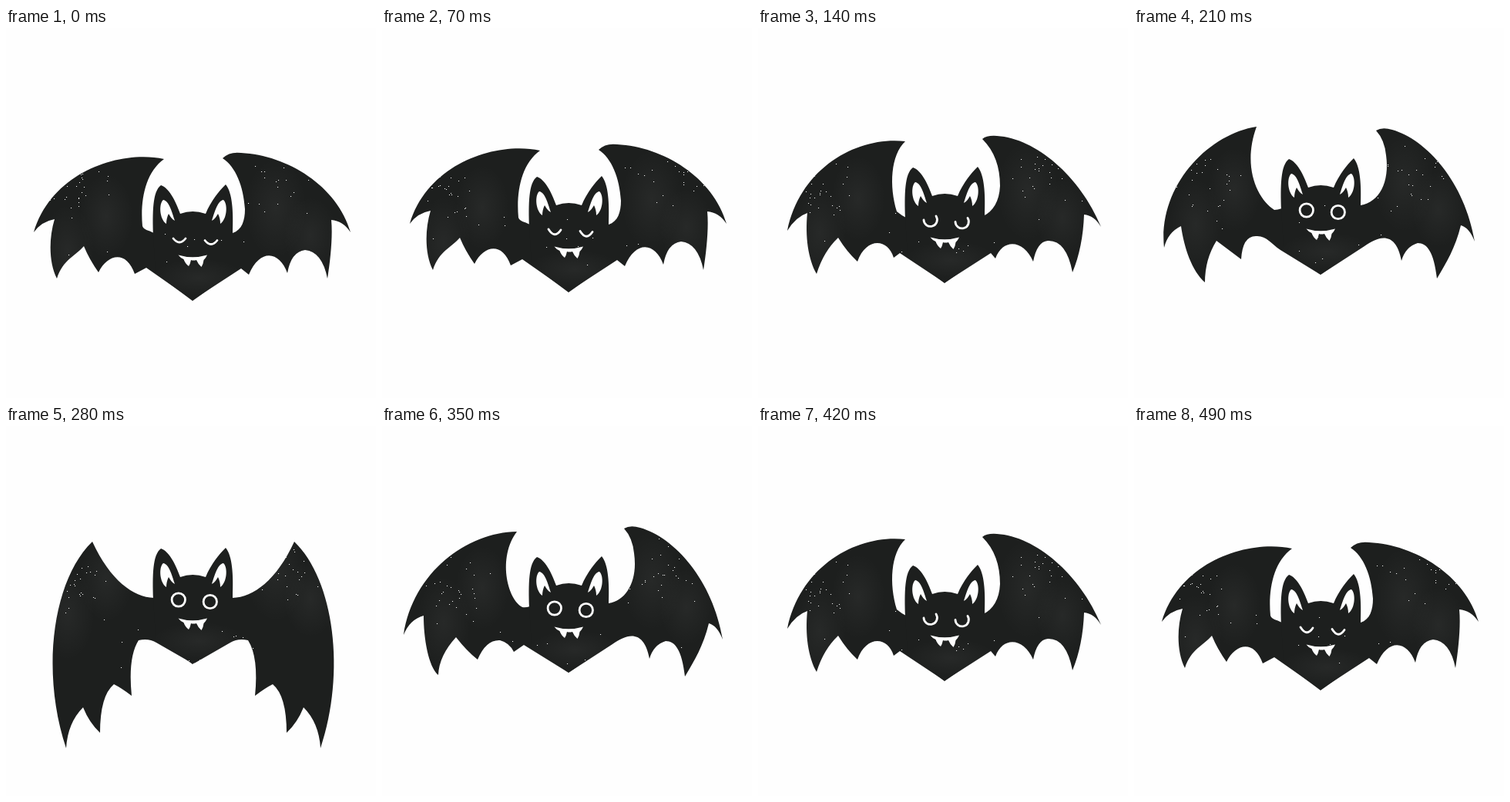
An HTML page for the animation above (560 ms loop, 480 by 480 pixels).

```html
<!DOCTYPE html>
<html lang="en">
<head>
<meta charset="utf-8">
<title>Flapping bat</title>
<style>
  html, body { margin: 0; width: 100%; height: 100%; overflow: hidden; background: #fefefe; }
  svg { display: block; width: 100%; height: 100%; }
  .ink { fill: #1d1f1e; }
  .white { fill: #fefefe; }
  .line { fill: none; stroke: #fefefe; stroke-width: 2.8; stroke-linecap: round; }
  .specks { fill: none; stroke: #f4f4f4; stroke-width: 1.1; }
</style>
</head>
<body>
<svg id="stage" viewBox="0 0 480 480">
  <defs>
    <radialGradient id="chalk">
      <stop offset="0" stop-color="#fff" stop-opacity=".045"/>
      <stop offset="1" stop-color="#fff" stop-opacity="0"/>
    </radialGradient>
  </defs>
</svg>
<script>
const STEP = 70;
const ORDER = ['low', 'rise', 'mid', 'high', 'top', 'turn', 'mid', 'rise'];

const BODY = `M191 236 C190 205 190 178 201 170 C211 173 220 190 226 207 Q242 201 259 207
  C266 190 276 178 285 169 C294 180 295 205 294 231 L294 283 L242 320 L194 284Z`;
const INNER_EAR = `M204 189 C211 190 215 203 219 216 C215 214 213 210 211 207
  C209 211 208 215 208 220 C199 214 198 194 204 189Z`;
const MOUTH = `M223.5 260.5 Q242 266 261 260.5 Q259 265 256.5 267 Q256 272 253.5 276
  Q249 272 247 267 Q243 268 240 267 Q239 272 237 275 Q232 271 230.5 266 Q226 264 223.5 260.5Z`;
const EYES = {
  closed: 'M217 239 Q225 249 233 239',
  drowsy: 'M216 238 Q224 251 232 239',
  half: 'M215 238 A8.7 8.7 0 1 0 231 233',
  open: 'M215.1 236.5 a8.7 8.7 0 1 1 17.4 0 a8.7 8.7 0 1 1 -17.4 0Z'
};

const lowLeft = `M192 266 C184 262 179 262 177 257 C174 225 180 188 205 170
  C150 158 60 185 36 265 Q46 251 63 248 C55 275 56 305 66 325
  C74 300 90 296 101 283 Q108 300 120 317 C132 293 156 288 167 319 L182 311 L242 353Z`;
const lowRight = `M294 266 C306 262 310 250 310 235 C308 205 298 180 281 169
  Q290 160 305 162 C365 165 430 205 447 265 Q437 250 422 249 C424 270 421 300 417 325
  Q410 290 388 288 Q370 290 365 318 C355 290 330 285 315 320 L305 312 L242 353Z`;
const midLeft = `M192 246 Q186 243 180 238 C170 205 172 165 191 147
  C130 140 55 180 38 263 Q49 245 64 240 C61 270 65 300 76 319
  Q85 290 104 272 Q115 290 129 303 C140 272 168 272 176 298 L184 292 L242 330.5Z`;
const midRight = `M292 244 C305 238 313 225 314 205 C314 180 307 160 291 144
  Q297 139 310 140 C360 143 418 192 445 258 Q436 243 423 242 C422 270 417 295 408 317
  Q400 275 376 276 Q362 277 357 303 C345 275 318 272 308 299 L302 292 L242 330.5Z`;
const highLeft = `M192 234 Q186 236 182 236 C160 222 140 180 159 128
  C95 138 31 206 39 285 Q44 265 61 257 C65 285 75 315 92 330
  Q92 300 107 276 Q123 288 139 300 Q141 268 160 270 C172 270 178 280 190 288 L242 320Z`;
const highRight = `M294 230 C318 226 332 200 327 165 Q325 145 314 133
  Q322 128 335 132 C380 145 429 200 442 277 Q435 259 424 256 C417 285 405 305 393 325
  C389 290 380 279 368 279 Q352 284 347 302 C340 265 320 268 299 283 L242 320Z`;
const turnLeft = `M192 234 Q186 236 182 235 C162 224 150 170 175 137
  C110 138 40 190 28 271 Q36 251 54 246 C54 275 60 312 73 323
  Q74 298 96 274 Q110 292 124 303 Q135 277 153 278 Q165 281 171 293 L184 284 L242 320Z`;
const topLeft = `M192 223 C165 222 135 200 112 150 C60 200 45 320 78 418
  Q80 385 100 365 Q108 385 122 398 Q122 350 140 335 Q150 340 163 350
  Q158 300 172 278 Q185 275 195 281 L242 308Z`;

const MIRROR = 'matrix(-1 0 0 1 486 0)';

// lift moves the body, shift moves the wings; no right wing means a mirrored left one
const POSES = {
  low:  { lift: 34, left: lowLeft, right: lowRight, eyes: 'closed' },
  rise: { lift: 23, shift: -11, left: lowLeft, right: lowRight, eyes: 'drowsy' },
  mid:  { lift: 11, left: midLeft, right: midRight, eyes: 'half' },
  high: { lift: 0, left: highLeft, right: highRight, eyes: 'open' },
  top:  { lift: -11, left: topLeft, eyes: 'open' },
  turn: { lift: 0, left: turnLeft, right: highRight, eyes: 'open' }
};

function randomFrom(seed) {
  return () => (seed = seed * 16807 % 2147483647) / 2147483647;
}

function specks(seed) {
  const random = randomFrom(seed);
  const spread = () => random() + random() + random() - 1.5;
  const cluster = (x, y, w, h, count) => Array.from({ length: count }, () =>
    `M${Math.round(x + spread() * w)} ${Math.round(y + spread() * h)}.5h1.1`).join('');
  return cluster(92, 212, 40, 45, 28) + cluster(365, 190, 55, 45, 28) + cluster(240, 285, 160, 45, 14);
}

function poseMarkup(name, index) {
  const { lift, shift = 0, left, right, eyes } = POSES[name];
  const wing = `translate(0 ${shift})`;
  const shapes = `<path d="${left}" transform="${wing}"/>
    <path d="${right || left}" transform="${right ? wing : MIRROR}"/>
    <path d="${BODY}" transform="translate(0 ${lift})"/>`;
  const blot = (x, y, rx, ry) =>
    `<ellipse cx="${x}" cy="${y + lift}" rx="${rx}" ry="${ry}" fill="url(#chalk)"/>`;
  return `<clipPath id="clip-${name}">${shapes}</clipPath>
    <g class="ink">${shapes}</g>
    <g clip-path="url(#clip-${name})">
      ${blot(80, 255, 35, 60)}${blot(130, 210, 35, 55)}${blot(350, 200, 40, 65)}
      ${blot(395, 235, 35, 50)}${blot(250, 290, 60, 25)}
      <path class="specks" d="${specks(4177 + index * 911)}"/>
    </g>
    <g transform="translate(0 ${lift})">
      <path class="white" d="${INNER_EAR}"/>
      <path class="white" d="${INNER_EAR}" transform="${MIRROR}"/>
      <path class="line" d="${EYES[eyes]}"/>
      <path class="line" d="${EYES[eyes]}" transform="translate(41 2.5)"/>
      <path class="white" d="${MOUTH}"/>
    </g>`;
}

const stage = document.getElementById('stage');
Object.keys(POSES).forEach((name, index) => {
  const group = document.createElementNS(stage.namespaceURI, 'g');
  group.innerHTML = poseMarkup(name, index);
  stage.append(group);
  const frames = [...ORDER, ORDER[0]].map((pose, i) => ({
    opacity: pose === name ? 1 : 0,
    offset: i / ORDER.length,
    easing: 'steps(1, end)'
  }));
  group.animate(frames, { duration: STEP * ORDER.length, iterations: Infinity });
});
</script>
</body>
</html>
```
